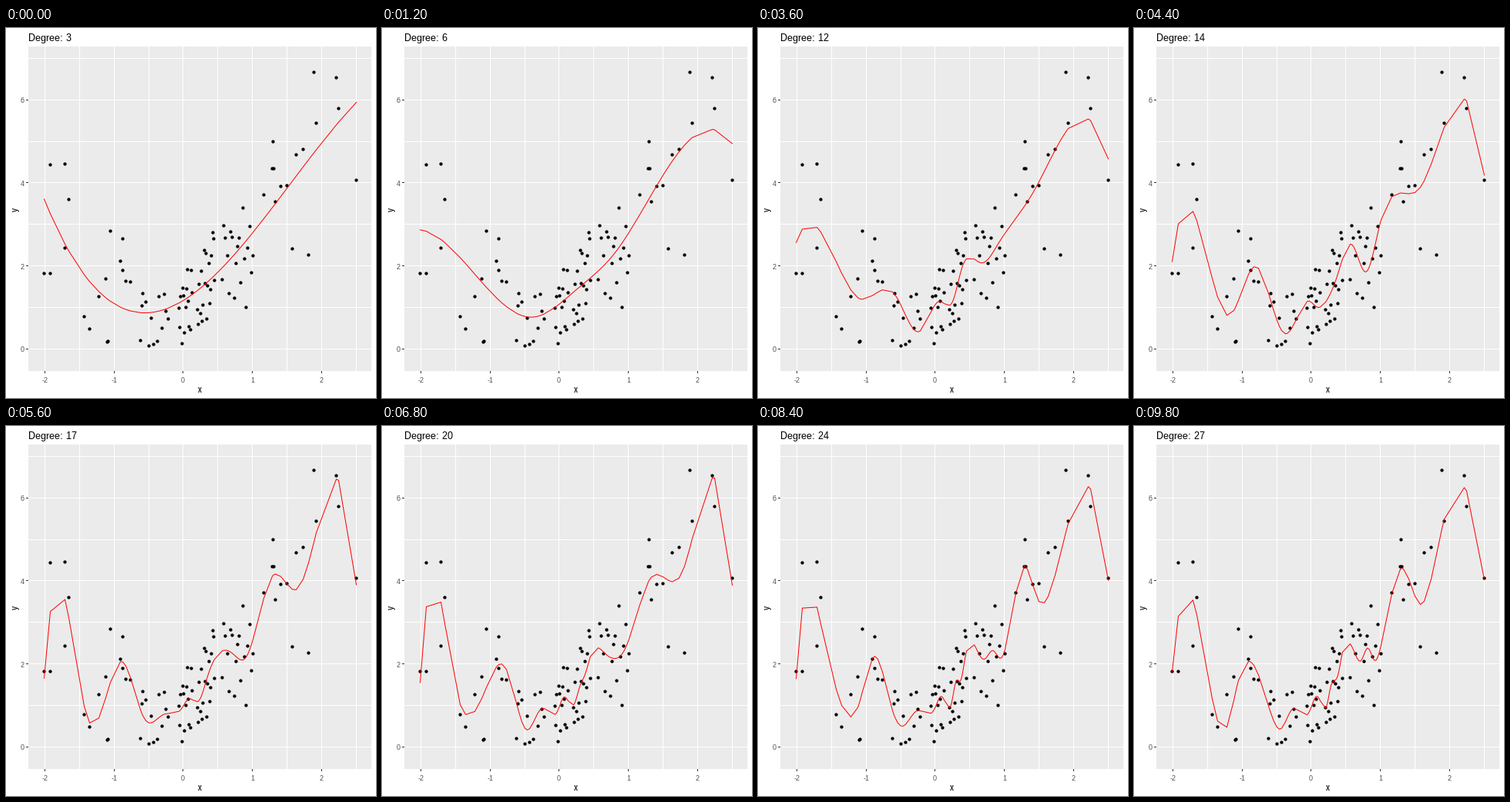
Write a matplotlib script that moves like this. It is 480 px wide and 480 px high and loops after 10 s.

```python
import numpy as np
import matplotlib.pyplot as plt
from matplotlib.animation import FuncAnimation
from matplotlib.patches import Rectangle

SIZE, DPI = 480, 96
FRAMES, INTERVAL = 50, 200
LOW, HIGH = 3, 27
PX = 72 / DPI

plt.rcParams.update({
    "font.family": "Liberation Sans",
    "text.hinting": "native",
    "text.hinting_factor": 1,
})

# Sparse outer samples, in stage pixels.
OUTER = [
    (49, 318), (57, 318), (57, 177), (76, 176), (76, 285), (81, 222),
    (101, 374), (108, 390), (120, 348), (129, 325), (131, 407), (132, 406),
    (135, 263), (148, 302), (151, 273), (151, 314), (155, 328), (161, 329),
    (174, 405), (176, 360), (177, 344), (181, 355), (185, 412), (188, 376),
    (191, 410), (196, 406), (198, 348), (334, 216), (345, 182), (346, 147),
    (347, 182), (349, 225), (356, 205), (364, 204), (371, 286), (376, 164),
    (385, 157), (392, 294), (399, 57), (402, 123), (428, 64), (431, 104),
    (454, 197),
]
# Dense middle: runs of x (start, end, count) scattered around a trend.
RUNS = [(202, 210, 4), (224, 241, 15), (248, 270, 19), (280, 320, 19)]
TREND_X = [202, 226, 234, 245, 258, 266, 283, 293, 304, 316]
TREND_Y = [367, 378, 345, 362, 335, 312, 275, 312, 282, 310]


def middle():
    """Stratified noise keeps each group of four centred on the trend."""
    rng = np.random.default_rng(4)
    x = np.concatenate([np.linspace(*run) for run in RUNS])
    levels = np.tile([-0.75, -0.25, 0.25, 0.75], (len(x) // 4 + 1, 1))
    noise = rng.permuted(levels, axis=1).ravel()[:len(x)]
    noise += rng.uniform(-0.2, 0.2, len(x))
    spread = np.interp(x, [202, 320], [30, 80])
    return np.column_stack([x, np.interp(x, TREND_X, TREND_Y) + spread * noise])


points = np.vstack([OUTER, middle()])
xs, ys = points[np.argsort(points[:, 0])].T


def ratio(a, b):
    """a / b, with 0 where b is 0."""
    a, b = np.broadcast_arrays(a, b)
    return np.divide(a, b, out=np.zeros(a.shape), where=b != 0)


def cubic_basis(x, inner):
    """Cubic B-spline basis with the given inner knots."""
    lo, hi = x.min(), x.max()
    t = np.r_[[lo] * 4, inner, [hi] * 4]
    col = x[:, None]
    b = ((t[:-1] <= col) & (col < t[1:])).astype(float)
    b[x == hi, len(t) - 5] = 1
    for k in range(1, 4):
        up = ratio(col - t[:-k - 1], t[k:-1] - t[:-k - 1])
        down = ratio(t[k + 1:] - col, t[k + 1:] - t[1:-k])
        b = up * b[:, :-1] + down * b[:, 1:]
    return b


def fit(df):
    """Least-squares spline with df degrees of freedom, at the samples."""
    inner = np.quantile(xs, np.linspace(0, 1, df - 1)[1:-1])
    basis = cubic_basis(xs, inner)
    return basis @ np.linalg.lstsq(basis, ys, rcond=None)[0]


degrees = np.arange(LOW, HIGH + 1)
fits = np.array([fit(d) for d in degrees])
keys = np.round((degrees - LOW) * (FRAMES - 1) / (HIGH - LOW))


def curve_at(i):
    k = min(np.searchsorted(keys, i, side="right") - 1, len(keys) - 2)
    w = (i - keys[k]) / (keys[k + 1] - keys[k])
    return (1 - w) * fits[k] + w * fits[k + 1]


fig = plt.figure(figsize=(SIZE / DPI, SIZE / DPI), dpi=DPI, facecolor="white")
ax = fig.add_axes([0, 0, 1, 1])
ax.set_xlim(0, SIZE)
ax.set_ylim(SIZE, 0)
ax.axis("off")


def box(x, y, w, h, color):
    ax.add_patch(Rectangle((x, y), w, h, fc=color, lw=0, antialiased=False))


def label(x, y, text, px, color="black", ha="center", va="baseline", **kw):
    return ax.text(x, y, text, size=px * PX, color=color, ha=ha, va=va, **kw)


X0, Y0, X1, Y1 = 29, 24, 474, 445
box(X0, Y0, X1 - X0, Y1 - Y0, "#EBEBEB")

for half in range(-4, 6):
    col = round(229.4 + 44.85 * half)
    box(col, Y0, 1, Y1 - Y0, "white")
    if half % 2 == 0:
        box(col, Y1, 1, 3, "#333333")
        label(col + 0.5, 460, str(half // 2), 9, "#4D4D4D")

for v in range(8):
    y = 416.3 - 53.85 * v
    box(X0, int(y), X1 - X0, 1, "white")
    if v % 2 == 0:
        box(X0 - 3, int(y), 3, 1, "#333333")
        label(24, y + 4, str(v), 9, "#4D4D4D", ha="right")

label(251, 473, "x", 12)
label(12.5, 235, "y", 12, va="center", rotation=90)
title = label(29, 17, "", 13, ha="left")

ax.plot(xs, ys, "o", color="black", ms=4.3 * PX, mew=0, snap=False, zorder=3)
line, = ax.plot([], [], color="red", lw=PX, zorder=4)


def draw(i):
    degree = round(LOW + (HIGH - LOW) * i / (FRAMES - 1))
    title.set_text(f"Degree: {degree}")
    line.set_data(xs + 0.5, curve_at(i) + 0.5)
    return line, title


anim = FuncAnimation(fig, draw, frames=FRAMES, interval=INTERVAL,
                     init_func=lambda: draw(0), repeat=True, repeat_delay=0)
plt.show()
```
